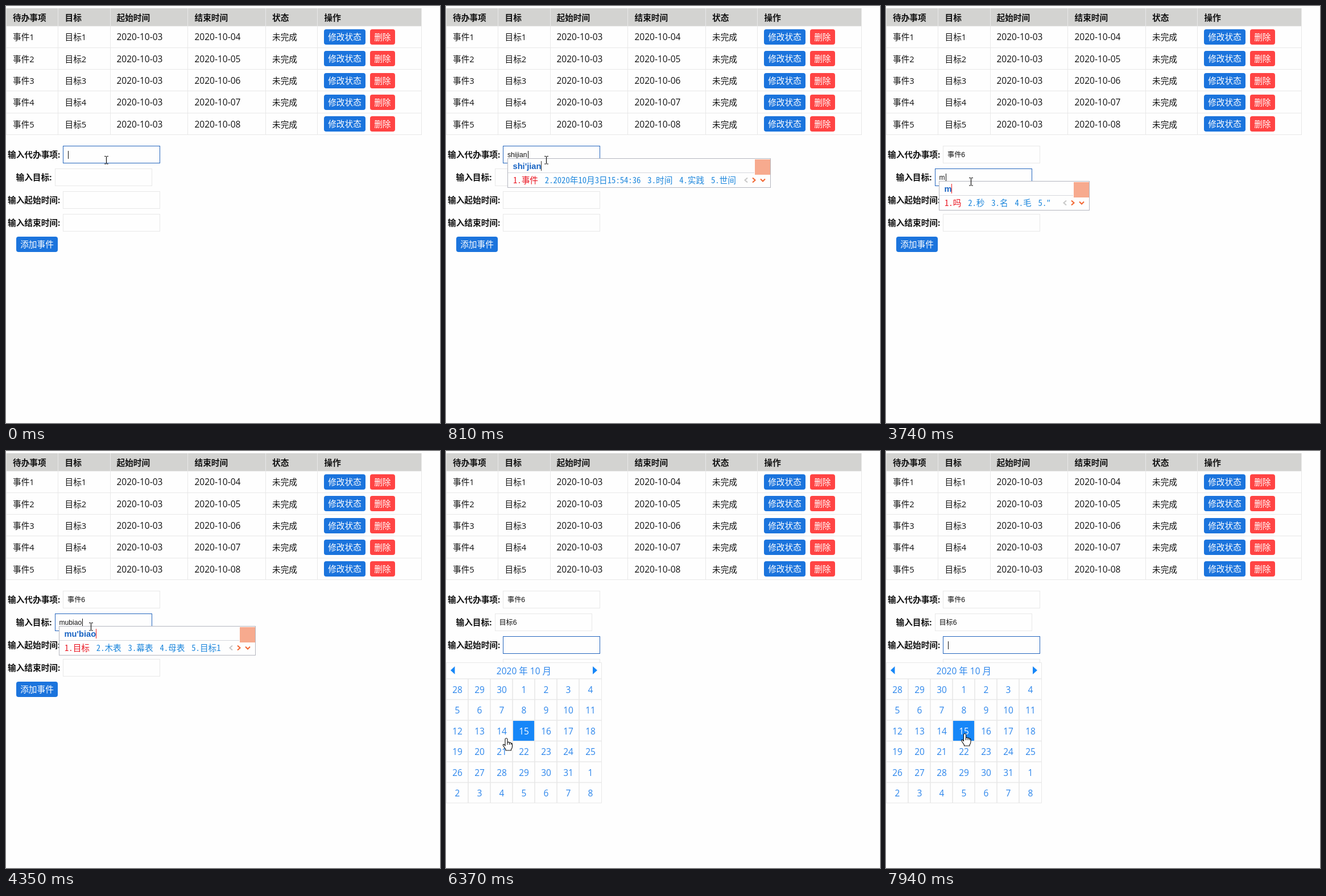
Recreate the animation shown at these times as an HTML page. Size 763 by 734 pixels, loop 8000 ms.

```html
<!DOCTYPE html>
<html lang="zh-CN">
<head>
<meta charset="utf-8">
<style>
html, body { margin: 0; width: 100%; height: 100%; overflow: hidden; background: #fefefe; }
svg { display: block; width: 763px; height: 734px; }
text { font: 14.67px "Open Sans", "Noto Sans CJK SC", "Noto Sans CJK", sans-serif; white-space: pre; }
.bold { font-weight: 700; }
.latin { font-size: 15.5px; }
.input { font: 12.2px "Liberation Sans", "Noto Sans CJK SC", "Noto Sans CJK", sans-serif; }
.pinyin { font: bold 14.67px "Liberation Sans", sans-serif; }
.candidate { font: 14.67px "Noto Sans Mono CJK SC", "Noto Sans CJK SC", "Noto Sans CJK", monospace; }
.day { text-anchor: middle; }
</style>
</head>
<body>
<svg viewBox="0 0 763 734"><g id="page"></g><g id="live"></g></svg>
<script>
const LOOP = 8000;
const LINE = '#e8e8e8', BLUE = '#1b74dd', RED = '#ff4444', SKY = '#1787f8';

// Input fields: box left, box top, text start, label, label start
const fields = [
  { x: 100, y: 246, textX: 108, label: '输入代办事项:', labelX: 3 },
  { x: 86, y: 286, textX: 93.4, label: '输入目标:', labelX: 17.5 },
  { x: 100, y: 326, textX: 108, label: '输入起始时间:', labelX: 3 },
  { x: 100, y: 366, textX: 108, label: '输入结束时间:', labelX: 3 },
];

// Typing: time, field, text, caret shown, then pinyin and candidates while composing
const typing = [
  [0, 0, '', 1],
  [120, 0, 's', 1, 's', '是 说 上 时 三'],
  [260, 0, 'sh', 1, 'sh', '是 上 说 时 生'],
  [400, 0, 'shi', 1, 'shi', '是 时 事 使 十'],
  [540, 0, 'shiji', 1, "shi'ji", '实际 世纪 时机 事迹 诗集'],
  [680, 0, 'shijia', 1, "shi'jia", '世家 施加 十佳 十家 实价'],
  [810, 0, 'shijian', 1, "shi'jian", '事件 2020年10月3日15:54:36 时间 实践 世间'],
  [1240, 0, '事件', 1],
  [1820, 0, '事件', 0],
  [2100, 0, '事件6', 1],
  [2510, 0, '事件6', 0],
  [2830, 1, '', 1],
  [3360, 1, '', 0],
  [3740, 1, 'm', 1, 'm', '吗 秒 名 毛 ″'],
  [3890, 1, 'mu', 1, 'mu', '目 木 母 幕 墓'],
  [4020, 1, 'mub', 1, "mu'b", '目标 幕布 目 木 母'],
  [4150, 1, 'mubia', 1, "mu'bia", '目标 幕 目 木 母'],
  [4290, 1, 'mubiao', 1, "mu'biao", '目标 木表 幕表 母表 目标1'],
  [4470, 1, '目标', 1],
  [5040, 1, '目标', 0],
  [5340, 1, '目标6', 1],
  [5850, 2, '', 1],
  [6370, 2, '', 0],
  [6890, 2, '', 1],
  [7410, 2, '', 0],
  [7940, 2, '', 1],
];

// Pointer: time, x, y; held until the next entry
const pointer = [
  [0, 176, 271], [2510, 172, 279], [2640, 160, 298], [2740, 151, 312], [2830, 149, 313],
  [3080, 149, 309], [5460, 146, 316], [5600, 133, 336], [5730, 124, 346],
  [5980, 126, 412], [6110, 130, 456], [6240, 126, 489], [6370, 106, 505],
  [6510, 84, 514], [6640, 66, 519], [6770, 63, 521], [6900, 78, 520],
  [7030, 100, 517], [7160, 120, 509], [7290, 133, 501], [7410, 138.5, 497],
];

const OPEN_CALENDAR = 5850, HOVER_LAG = 130;
const COLUMN = 39, ROW = 36.5, GRID_TOP = 401;

const at = (list, t) => list.findLast(entry => entry[0] <= t) || list[0];
const text = (x, y, value, fill = '#111', cls = '') =>
  `<text x="${x}" y="${y}" fill="${fill}" class="${cls}">${value}</text>`;
const rect = (x, y, w, h, fill, extra = '') =>
  `<rect x="${x}" y="${y}" width="${w}" height="${h}" fill="${fill}" ${extra}/>`;
const path = (d, stroke, fill = 'none', extra = '') =>
  `<path d="${d}" stroke="${stroke}" fill="${fill}" ${extra}/>`;
const button = (x, y, w, label, fill) =>
  rect(x, y, w, 27, fill, 'rx="4"') + text(x + 7.2, y + 19, label, '#fff');
const box = ({ x, y }, stroke) => rect(x + .5, y + .5, 170, 30, '#fefefe', `stroke="${stroke}"`);

const measureContext = document.createElement('canvas').getContext('2d');
function widthOf(value, font) {
  measureContext.font = font;
  return measureContext.measureText(value).width;
}

function drawPage() {
  const edges = [0, 91, 183, 319, 456, 547, 730];
  const headings = ['待办事项', '目标', '起始时间', '结束时间', '状态', '操作'];
  const textX = i => [12, 103.5, 194.5, 331.5, 468, 559.5][i];
  let out = rect(0, 4, 731, 31, '#d3d3d1');
  headings.forEach((h, i) => out += text(textX(i), 25.5, h, '#111', 'bold'));
  edges.forEach(x => out += path(`M${x + .5} 4V227`, LINE));
  for (let i = 0; i < 6; i++) out += path(`M0 ${Math.floor(35 + 38.3 * i) + .5}H731`, LINE);
  for (let i = 0; i < 5; i++) {
    const y = Math.round(60.2 + 38.35 * i), top = Math.round(41 + 38.35 * i);
    out += text(textX(0), y, `事件${i + 1}`) + text(textX(1), y, `目标${i + 1}`)
      + text(textX(2), y, '2020-10-03', '#111', 'latin')
      + text(textX(3), y, `2020-10-0${i + 4}`, '#111', 'latin')
      + text(textX(4), y, '未完成')
      + button(559, top, 73, '修改状态', BLUE) + button(640, top, 44, '删除', RED);
  }
  fields.forEach(f => out += text(f.labelX, f.y + 21, f.label, '#111', 'bold') + box(f, LINE));
  return out + button(18, 406, 73, '添加事件', BLUE);
}

function drawPopup(field, pinyin, candidates) {
  const left = Math.floor(field.textX), top = field.y + 22, half = 14.67 / 2, gap = 11.8;
  let x = left + 10, items = '';
  candidates.split(' ').forEach((word, i) => {
    const label = `${i + 1}.${word}`;
    items += text(x, top + 43.5, label, i ? '#1c86dc' : '#ea1420', 'candidate');
    for (const char of label) x += char > '\u00ff' ? half * 2 : half;
    x += gap;
  });
  const right = Math.round(x - gap + 61), y = top + 38.5;
  const caretX = Math.round(left + 10 + widthOf(pinyin, 'bold 14.67px "Liberation Sans", sans-serif')) - .5;
  const chevron = (d, color) => path(d, color, 'none', 'stroke-width="2"');
  return rect(left + .5, top + .5, right - left - 1, 51, '#fefefe', 'stroke="#b4b6bf"')
    + path(`M${left + 1} ${top + 25.5}H${right - 29}`, '#d5d7dc')
    + rect(right - 28, top + 2, 27, 27, '#f7aa8e')
    + text(left + 9.5, top + 19, pinyin, '#1763c3', 'pinyin')
    + path(`M${caretX} ${top + 5}v17`, field === fields[0] ? '#333' : '#e22')
    + items
    + chevron(`M${right - 41} ${y - 4}l-4.5 4l4.5 4`, '#c8c8c8')
    + chevron(`M${right - 32} ${y - 4}l4.5 4l-4.5 4`, '#f26530')
    + chevron(`M${right - 18} ${y - 2}l4 4l4 -4`, '#f26530');
}

function drawCalendar(t) {
  const [, px, py] = at(pointer, t - HOVER_LAG);
  const hovered = py < GRID_TOP ? -1 : Math.floor((py - GRID_TOP) / ROW) * 7 + Math.floor(px / COLUMN);
  let out = rect(0, 372, 274, 248, '#fefefe') + path('M.5 372.5H273.5V619.5H.5Z', LINE)
    + path('M8 386L15.5 379V393ZM266 386L258 379V393Z', 'none', SKY)
    + text(137, 392.5, '2020 年 10 月', '#2c86ec', 'day latin');
  for (let i = 0; i < 6; i++) {
    out += path(`M0 ${GRID_TOP + ROW * i}H274`, LINE, 'none', 'stroke-width="1.6"');
    out += path(`M${COLUMN * (i + 1)} 401V620`, LINE, 'none', 'stroke-width="1.6"');
  }
  for (let i = 0; i < 42; i++) {
    const col = i % 7, row = Math.floor(i / 7), active = i === hovered;
    const day = i < 3 ? 28 + i : i < 34 ? i - 2 : i - 33;
    if (active) out += rect(COLUMN * col + 1, GRID_TOP + ROW * row + 1, 37, 35, SKY);
    out += text(20 + COLUMN * col, 425.7 + ROW * row, day, active ? '#fff' : '#2c86ec', 'day latin');
  }
  return out;
}

function drawPointer(t) {
  const [, x, y] = at(pointer, t);
  const hand = 'M-2 2Q0 -1 2 2V8Q4 6.5 5.5 8.5Q7.5 7.5 8.5 9.5Q10.5 9 10.5 11.5V15Q10.5 18 8.5 20V22H-1V20.5L-5.5 13.5Q-6.5 11 -4 11.5L-2 13.5Z';
  const beam = 'M-3 -6.5H0M1 -6.5H4M.5 -6V6.5M-3 7H0M1 7H4';
  const shape = y > 372
    ? path(hand + 'M2 8V12M5.5 8.5V12M8.5 9.5V12', '#111', '#fff', 'stroke-width="1.1"')
    : path(beam, '#111', 'none', 'stroke-width="1.2"');
  return `<g transform="translate(${x} ${y})">${shape}</g>`;
}

function drawLive(t) {
  const [, active, value, caret, pinyin, candidates] = at(typing, t);
  let out = '';
  fields.slice(0, active + 1).forEach((f, i) => {
    const content = i === active ? value : ['事件6', '目标6'][i];
    out += box(f, i === active ? '#2465bd' : LINE) + text(f.textX, f.y + 20, content, '#111', 'input');
  });
  const field = fields[active];
  if (caret) {
    const font = '12.2px "Liberation Sans", "Noto Sans CJK SC", "Noto Sans CJK", sans-serif';
    out += rect(Math.round(field.textX + 1 + widthOf(value, font)), field.y + 9, 1, 14, '#111');
  }
  if (pinyin) out += drawPopup(field, pinyin, candidates);
  if (t >= OPEN_CALENDAR) out += drawCalendar(t);
  return out + drawPointer(t);
}

const live = document.getElementById('live');
document.getElementById('page').innerHTML = drawPage();
const start = performance.now();
let shown = '';
function tick() {
  const markup = drawLive((performance.now() - start) % LOOP);
  if (markup !== shown) live.innerHTML = shown = markup;
  requestAnimationFrame(tick);
}
tick();
</script>
</body>
</html>
```
